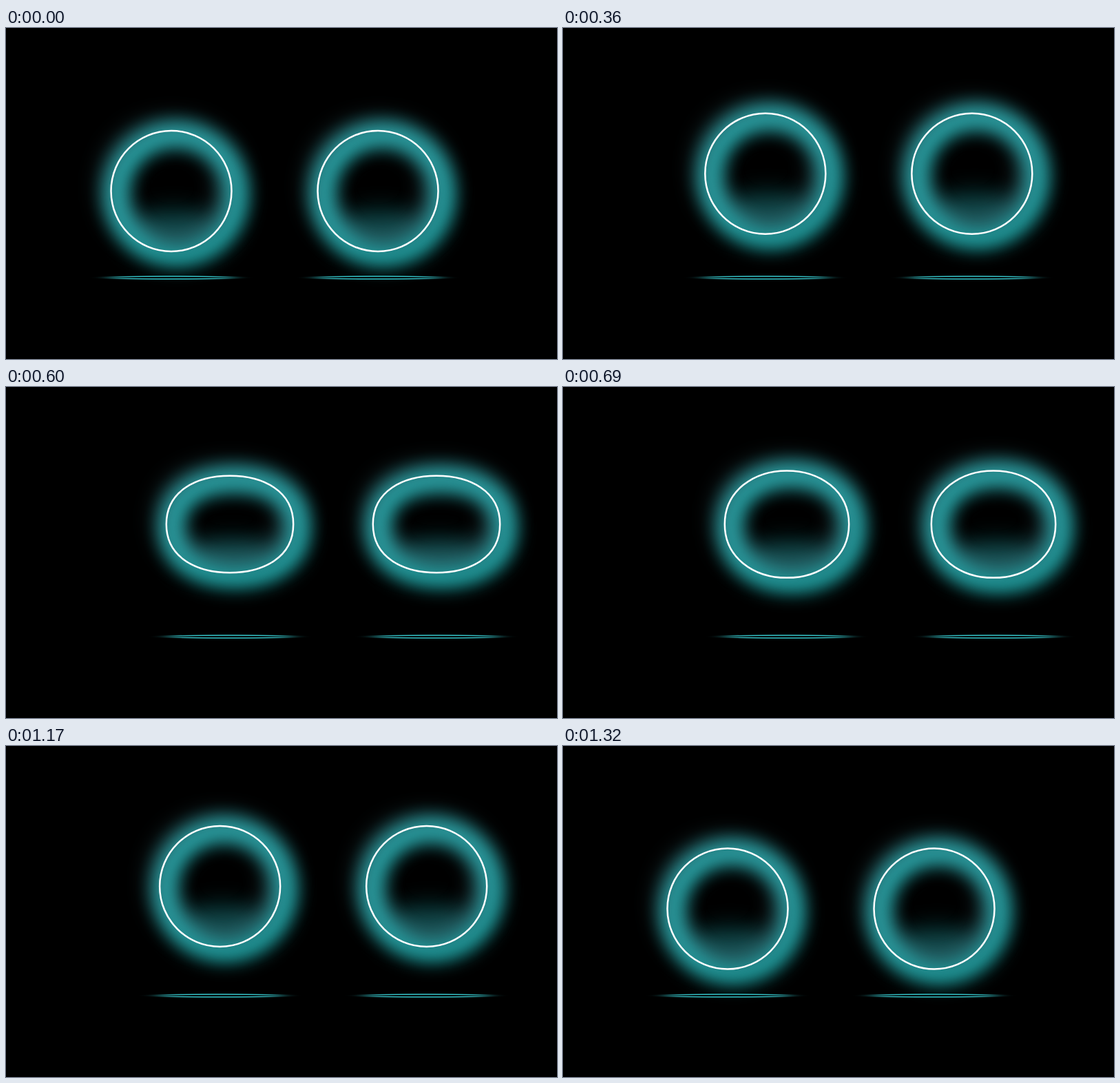
Animation, 800 px wide and 480 px high, one loop 1.62 s. Source, as an HTML page:

```html
<!DOCTYPE html>
<html lang="en">
<head>
<meta charset="utf-8">
<title>Glowing rings</title>
<style>
  html, body { margin: 0; width: 100%; height: 100%; overflow: hidden; background: #000; }
  svg { display: block; width: 100%; height: 100%; }
  path, ellipse { fill: none; }
</style>
</head>
<body>
<svg viewBox="0 0 800 480">
  <defs>
    <filter id="soft" filterUnits="userSpaceOnUse" x="-180" y="-180" width="360" height="360" color-interpolation-filters="sRGB">
      <feGaussianBlur stdDeviation="13"/>
    </filter>
    <filter id="softer" filterUnits="userSpaceOnUse" x="-180" y="-180" width="360" height="360" color-interpolation-filters="sRGB">
      <feGaussianBlur stdDeviation="16"/>
    </filter>
    <filter id="streak" filterUnits="userSpaceOnUse" x="-160" y="-10" width="320" height="20" color-interpolation-filters="sRGB">
      <feGaussianBlur stdDeviation="13 0.3"/>
    </filter>
    <g id="shadow" filter="url(#streak)">
      <ellipse rx="88" ry="2" stroke="#35c4c9" stroke-width="1.5"/>
    </g>
    <g id="ring">
      <g filter="url(#softer)"><ellipse id="pool" rx="54" style="fill:#1a9a9c" opacity=".36"/></g>
      <g filter="url(#soft)"><path id="outer" stroke="#1aa0a0" stroke-width="32"/></g>
      <g filter="url(#softer)"><path id="inner" stroke="#4ba5af" stroke-width="33" opacity=".47"/></g>
      <path id="line" stroke="#fff" stroke-width="2.5"/>
    </g>
  </defs>
  <g id="shadows"><use href="#shadow"/><use href="#shadow" x="300"/></g>
  <g id="rings"><use href="#ring"/><use href="#ring" x="300"/></g>
</svg>
<script>
const LOOP = 1620, STEP = 30, RADIUS = 87.5, HANDLE = RADIUS * 0.5523;
const byId = id => document.getElementById(id);
const clamp = v => Math.min(1, Math.max(0, v));
const mix = (a, b, p) => a + (b - a) * p;
const span = (t, from, to) => clamp((t - from) / (to - from));

// Eases with the control points (x1, 0) and (x2, 1)
function ease(x, x1, x2) {
  let lo = 0, hi = 1;
  for (let i = 0; i < 24; i++) {
    const s = (lo + hi) / 2, r = 1 - s;
    if (3 * s * r * r * x1 + 3 * s * s * r * x2 + s ** 3 < x) lo = s; else hi = s;
  }
  return lo * lo * (3 - 2 * lo);
}

// Oval whose handles keep their length when its anchors move
function oval(rx, ry, dx = 0, dy = 0) {
  const h = HANDLE;
  const p = (x, y) => `${(x + dx).toFixed(2)} ${(y + dy).toFixed(2)} `;
  return `M${p(rx, 0)}C${p(rx, h)}${p(h, ry)}${p(0, ry)}` +
    `C${p(-h, ry)}${p(-rx, h)}${p(-rx, 0)}` +
    `C${p(-rx, -h)}${p(-h, -ry)}${p(0, -ry)}` +
    `C${p(h, -ry)}${p(rx, -h)}${p(rx, 0)}Z`;
}

function position(t) {
  if (t < 1170) {
    const p = span(t, 0, 480);
    return [mix(240, 325, ease(p, 0.68, 0.8)), mix(236.5, 199, ease(p, 0.7, 0.74))];
  }
  const p = span(t, 1140, 1320);
  return [mix(325, 239, p), mix(199, 236, p ** 1.18)];
}

function draw(t) {
  const [x, y] = position(t);
  const squash = t < 600 ? 0 : 1 - span(t, 600, 810);
  const rx = mix(RADIUS, 92.2, squash), ry = mix(RADIUS, 70.2, squash);
  byId("line").setAttribute("d", oval(rx, ry));
  byId("outer").setAttribute("d", oval(rx, ry, 8, 6));
  byId("inner").setAttribute("d", oval(rx - 2, ry - 8, 1, -7));
  byId("pool").setAttribute("cx", 4);
  byId("pool").setAttribute("cy", ry * 0.55);
  byId("pool").setAttribute("ry", ry * 0.26);
  byId("rings").setAttribute("transform", `translate(${x} ${y})`);
  byId("shadows").setAttribute("transform", `translate(${x} 362)`);
}

const start = performance.now();
let shown = -1;
function tick() {
  const t = Math.floor((performance.now() - start) % LOOP / STEP) * STEP;
  if (t !== shown) draw(shown = t);
  requestAnimationFrame(tick);
}
tick();
</script>
</body>
</html>
```
